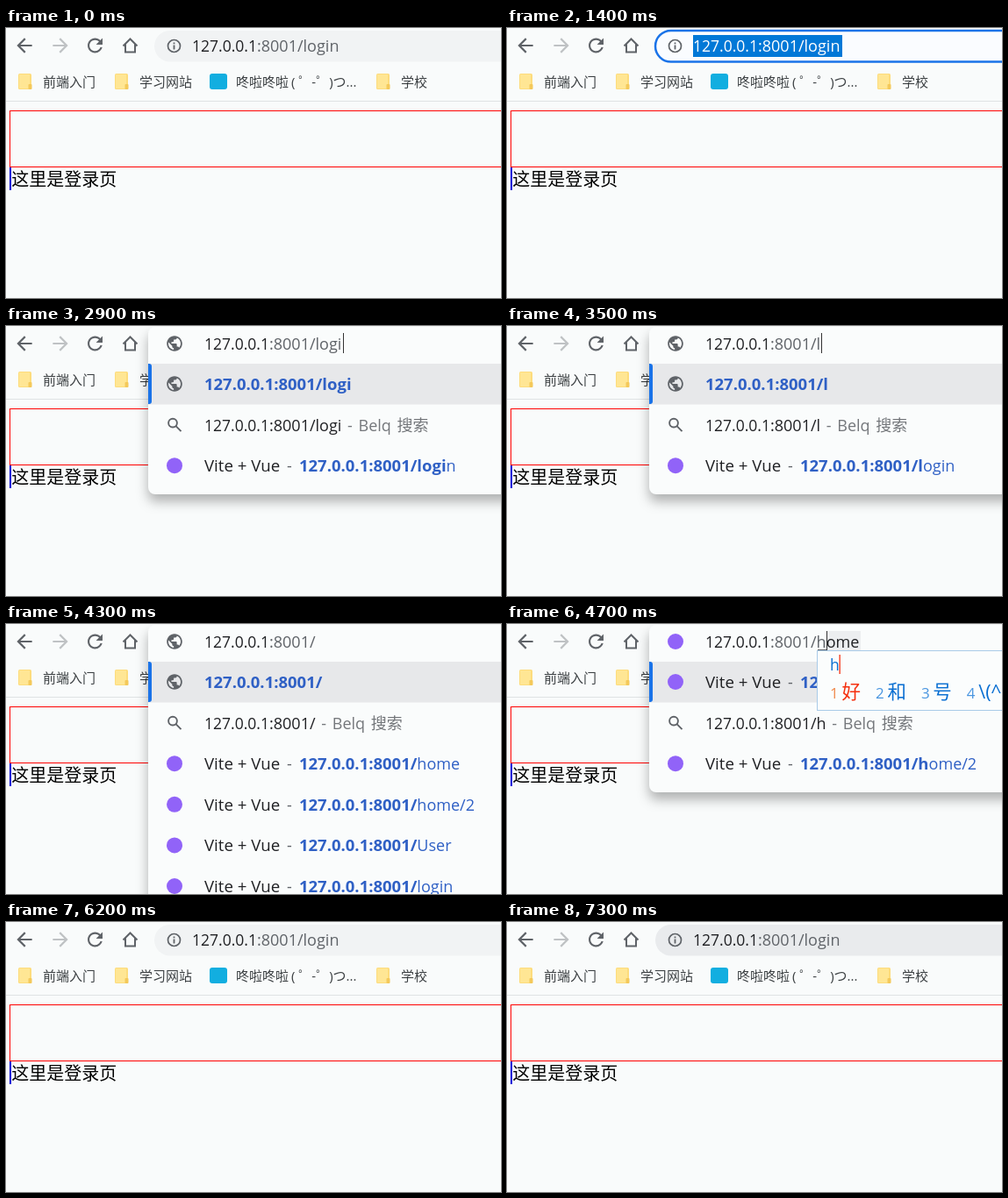
These frames come from a looping animation (564 px wide and 308 px high, 8 s). An HTML page:

```html
<!DOCTYPE html>
<html lang="zh">
<head>
<meta charset="utf-8">
<style>
  html, body { margin: 0; width: 100%; height: 100%; overflow: hidden; background: #f9fbfb; }
  svg { display: block; width: 564px; height: 308px; }
  text { font-family: "Open Sans", "Noto Sans CJK SC", "Noto Sans CJK", sans-serif; font-size: 18px; white-space: pre; }
  .host { font-size: 17.5px; }
  .bold { font-weight: 700; font-size: 18.5px; }
  .title { font-size: 18.7px; }
  .heading { font-size: 20px; }
  .mark { font-size: 15px; }
  .engine { word-spacing: 2px; }
  .label { font-size: 17px; }
  .word { font-size: 21.5px; }
  .popup { filter: drop-shadow(0 8px 7px rgba(0, 0, 0, .3)); }
</style>
</head>
<body>
<svg id="stage" viewBox="0 0 564 308"></svg>
<script>
const LOOP = 8000;
const HOST = '127.0.0.1', PORT = ':8001/';
const INK = '#202124', GRAY = '#5f6368', BLUE = '#2f60c5', ACCENT = '#1a73e8';

const ARROW = 'M20 11H7.83l5.59-5.59L12 4l-8 8 8 8 1.41-1.41L7.83 13H20v-2z';
const RELOAD = 'M17.65 6.35C16.2 4.9 14.21 4 12 4c-4.42 0-7.99 3.58-7.99 8s3.57 8 7.99 8c3.73 0 6.84-2.55 7.73-6h-2.08c-.82 2.33-3.04 4-5.65 4-3.31 0-6-2.69-6-6s2.69-6 6-6c1.66 0 3.14.69 4.22 1.78L13 11h7V4l-2.35 2.35z';
const CLOSE = 'M19 6.4L17.6 5 12 10.6 6.4 5 5 6.4l5.6 5.6L5 17.6 6.4 19l5.6-5.6 5.6 5.6 1.4-1.4-5.6-5.6z';
const GLOBE = 'M12 2C6.48 2 2 6.48 2 12s4.48 10 10 10 10-4.48 10-10S17.52 2 12 2zm-1 17.93c-3.95-.49-7-3.85-7-7.93 0-.62.08-1.21.21-1.79L9 15v1c0 1.1.9 2 2 2v1.93zm6.9-2.54c-.26-.81-1-1.39-1.9-1.39h-1v-3c0-.55-.45-1-1-1H8v-2h2c.55 0 1-.45 1-1V7h2c1.1 0 2-.9 2-2v-.41c2.93 1.19 5 4.06 5 7.41 0 2.08-.8 3.97-2.1 5.39z';

// Suggestion lists: '@' is the typed address, '?' a web search, others are visited paths
const LOGIN = ['@', '?', 'login'];
const ALL = ['@', '?', 'home', 'home/2', 'User', 'login', 'home/1'];
const HOME = ['home', '?', 'home/2'];

const steps = [
  { t: 0 },
  { t: 700, chip: true },
  { t: 900, hover: true },
  { t: 1400, focus: true, selected: true },
  { t: 2200, focus: true, caret: 382.5 },
  { t: 2700, focus: true },
  { t: 2900, list: LOGIN, typed: 'logi', caret: 384.5 },
  { t: 3100, list: LOGIN, typed: 'log', caret: 379.5 },
  { t: 3300, list: LOGIN, typed: 'lo', caret: 369.5 },
  { t: 3500, list: LOGIN, typed: 'l', caret: 358.5 },
  { t: 3800, list: ALL, typed: '', caret: 353.5 },
  { t: 4300, list: ALL, typed: '' },
  { t: 4700, list: HOME, typed: 'h', rest: 'ome', caret: 364.5, words: ['好', '和', '号', '\\(^o^)/'] },
  { t: 4900, list: HOME, typed: 'ho', rest: 'me', caret: 375.5, words: ['后', '候', '厚', '\\(^o^)/'] },
  { t: 5000, list: HOME, typed: 'hom', rest: 'e', caret: 392.5, words: ['home', 'HomeTuq'] },
  { t: 5100, list: HOME, typed: 'home', caret: 402.5, words: ['home', 'HomeTuq'] },
  { t: 5500, list: HOME, typed: 'home', caret: 402.5 },
  { t: 5900, list: HOME, typed: 'home' },
  { t: 6100, path: 'home', loading: true },
  { t: 6200 },
  { t: 7300, hover: true }
];

const rect = (x, y, w, h, fill, more = '') =>
  `<rect x="${x}" y="${y}" width="${w}" height="${h}" fill="${fill}" ${more}/>`;
const text = (x, y, body, fill = INK, cls = '') =>
  `<text x="${x}" y="${y}" fill="${fill}" class="${cls}">${body}</text>`;
const span = (body, fill, cls = '', dx = 0) =>
  `<tspan dx="${dx}" fill="${fill}" class="${cls}">${body}</tspan>`;
const icon = (d, x, y, scale, fill = GRAY) =>
  `<path d="${d}" fill="${fill}" transform="translate(${x} ${y}) scale(${scale}) translate(-12 -12)"/>`;
const siteDot = y => `<circle cx="192" cy="${y}" r="9" fill="#9163f8"/>`;
const caretLine = x => x ? rect(x - .5, 8, 1, 23, '#333') : '';
const address = (x, y, path, fill = GRAY, hostFill = INK) =>
  text(x, y, HOST, hostFill, 'host') + text(x + 74, y, PORT + path, fill);

function folder(x) {
  return rect(x, 52, 15, 18, '#fddc7c', 'rx="1.5"') + rect(x + 1, 53, 12, 16, '#ffe694') +
    rect(x + 11.5, 64, 4, 6, '#f4c95a', 'rx="1"');
}

function page() {
  const names = [[42, '前端入门'], [152, '学习网站'], [262, '咚啦咚啦'], [325, '( ゜-゜)つ...'], [450, '学校']];
  return rect(0, 83, 564, 1, '#dfe2e4') +
    [14, 124, 422].map(folder).join('') +
    rect(232, 52, 20, 18, '#12aee0', 'rx="3"') +
    names.map(([x, s]) => text(x, 66.5, s, '#3c4043', 'mark')).join('') +
    rect(4.5, 94.5, 570, 64, 'none', 'stroke="#f00"') +
    rect(4, 159, 2, 26, '#0000d8') +
    text(6.3, 180, '这里是登录页', '#000', 'heading');
}

function toolbar(s) {
  return icon(ARROW, 21, 20, 1.08) +
    `<g transform="matrix(-1 0 0 1 83 0)">${icon(ARROW, 21, 20, 1.08, '#bfc2c4')}</g>` +
    icon(s.loading ? CLOSE : RELOAD, 101.5, 20, 1.06) +
    `<path d="M133.5 20.5l8-8 8 8M136 18.5v9h11v-9" fill="none" stroke="${GRAY}" stroke-width="2"/>`;
}

function omnibox(s) {
  const fill = s.focus ? '#fafcff' : s.hover ? '#e9ebed' : '#f1f3f4';
  const ring = s.focus ? `stroke="${ACCENT}" stroke-width="2.5"` : '';
  return rect(169, 3, 440, 35.5, fill, `rx="17.75" ${ring}`) +
    `<circle cx="191.5" cy="20.5" r="7" fill="none" stroke="${GRAY}" stroke-width="1.7"/>` +
    rect(190.6, 19.5, 1.8, 5, GRAY) + rect(190.6, 16.5, 1.8, 1.8, GRAY) +
    (s.selected
      ? rect(212, 8, 170, 25, '#0078d7') + address(212, 27, 'login', '#fff', '#fff')
      : address(212, 27, s.path || 'login')) +
    caretLine(s.caret);
}

function row(kind, i, typed) {
  const mid = 66 + 46.6 * i, base = mid + 7;
  if (kind === '@') {
    return icon(GLOBE, 192, mid, .88) + text(226, base, HOST + PORT + typed, BLUE, 'bold');
  }
  if (kind === '?') {
    return `<g fill="none" stroke="${GRAY}" stroke-width="1.9"><circle cx="190" cy="${mid - 2}" r="4.9"/>` +
      `<path d="M193.5 ${mid + 1.5}l6 6"/></g>` +
      address(226, base, typed + span(' - Belq 搜索', '#74777b', 'engine'), INK);
  }
  return siteDot(mid) + text(226, base, 'Vite + Vue', INK, 'title') + text(320, base, '-', GRAY) +
    text(334, base, span(HOST + PORT + typed, BLUE, 'bold') + kind.slice(typed.length), BLUE);
}

function popup(s) {
  const { list, typed, rest = '' } = s;
  const composing = rest
    ? rect(s.caret, 8, 403 - s.caret, 23, '#eceef0') + rect(354, 29, s.caret - 354, 1, GRAY) : '';
  return rect(162, 1, 440, 51.2 + 46.6 * list.length, '#fafcfc', 'rx="8" class="popup"') +
    rect(162, 43, 402, 46.5, '#e7e8ea') +
    `<path d="M162 43h1q3 0 3 3v40q0 3-3 3h-1z" fill="${ACCENT}"/>` +
    (list[0] === '@' ? icon(GLOBE, 192, 20, .88) : siteDot(20)) +
    composing + address(226, 27, typed + span(rest, INK)) + caretLine(s.caret) +
    list.map((kind, i) => row(kind, i, typed)).join('');
}

function inputMethod(s) {
  const words = s.words.map((word, i) =>
    span(i + 1, i ? '#4a96e0' : '#f08a4c', 'label', i ? 17 : 0) +
    span(word, i ? '#0a6fd2' : '#f5300f', 'word', 3.7)).join('');
  return rect(353.5, 30.5, 230, 68, '#fbfdfd', 'stroke="#a9cbe8"') +
    text(368, 53, s.typed, '#0a6fd2', 'host') +
    rect(s.caret + 14, 35, 1.3, 22, '#f5300f') +
    text(368, 85, words);
}

const stage = document.getElementById('stage');
let shown;

function draw(now) {
  const t = now % LOOP;
  const s = steps.findLast(step => step.t <= t);
  if (s === shown) return;
  shown = s;
  stage.innerHTML = rect(0, 0, 564, 308, '#f9fbfb') +
    (s.chip ? rect(413, 47, 76, 29, '#f0f2f3', 'rx="14.5"') : '') +
    page() + toolbar(s) +
    (s.list ? popup(s) : omnibox(s)) +
    (s.words ? inputMethod(s) : '');
}

const start = performance.now();
function tick() {
  draw(performance.now() - start);
  requestAnimationFrame(tick);
}
tick();
</script>
</body>
</html>
```
